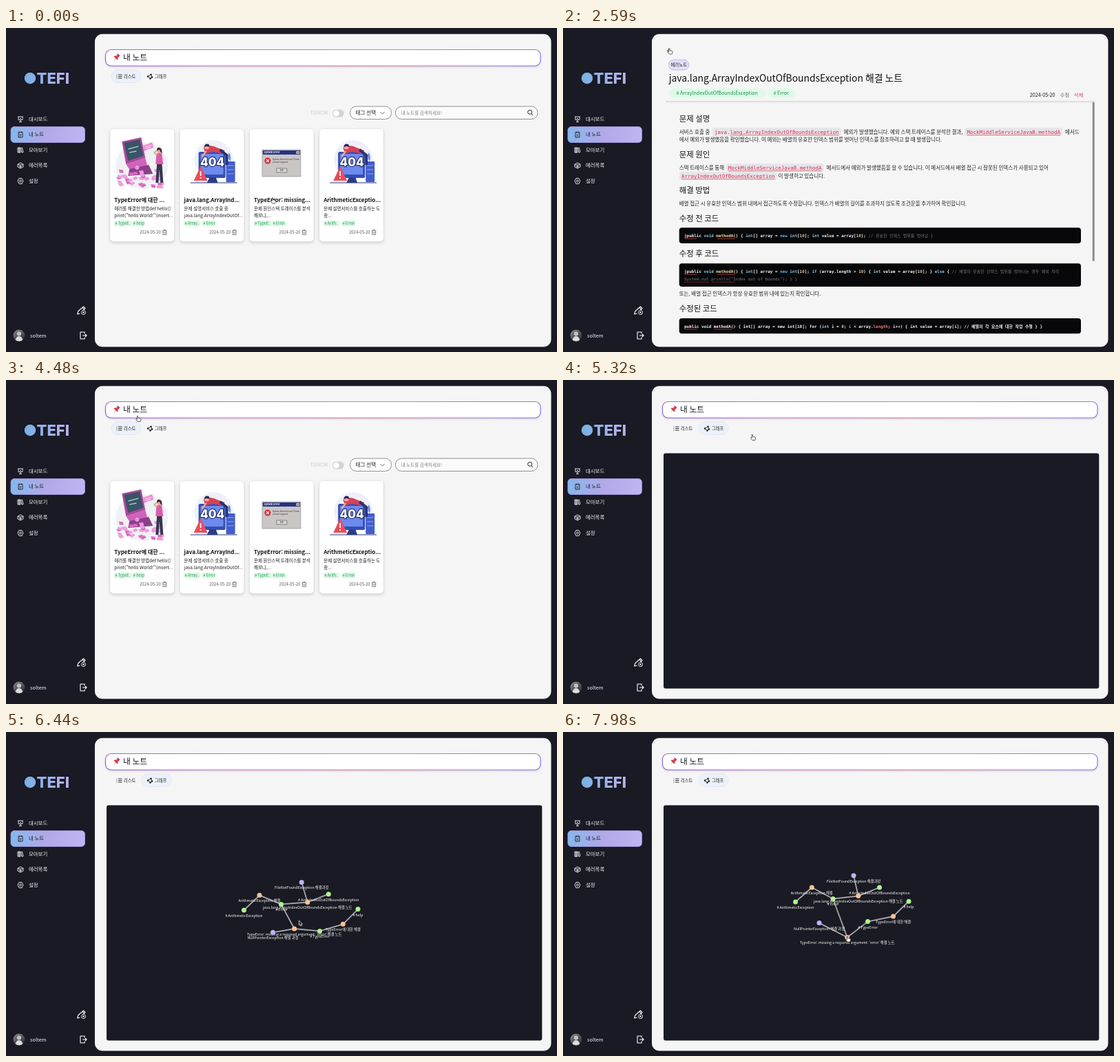
Recreate the animation shown at these times as an HTML page with a canvas. Size 800x471 px, loop 8000 ms.

```html
<!DOCTYPE html>
<html lang="ko">
<head>
<meta charset="utf-8">
<title>내 노트</title>
<style>
html, body { margin: 0; width: 100%; height: 100%; overflow: hidden; background: #191a23; }
canvas { display: block; width: 800px; height: 471px; }
</style>
</head>
<body>
<canvas id="stage"></canvas>
<script>
const LOOP = 8000, STEP = 70;
const SANS = '"Noto Sans CJK KR", "Noto Sans CJK", "Noto Sans", sans-serif';
const MONO = '"DejaVu Sans Mono", "Noto Sans CJK KR", monospace';
const DARK = '#191a23', PANEL = '#f5f5f5', INK = '#1c1c20';
const canvas = document.getElementById('stage');
const c = canvas.getContext('2d');
const dpr = window.devicePixelRatio || 1;
canvas.width = 800 * dpr;
canvas.height = 471 * dpr;

const clamp = v => Math.max(0, Math.min(1, v));
const smooth = v => { v = clamp(v); return v * v * (3 - 2 * v); };
const mix = (a, b, k) => a + (b - a) * k;

// y is the optical middle of the line
function text(s, x, y, size, color = INK, weight = 400, align = 'left', font = SANS) {
  c.font = `${weight} ${size}px ${font}`;
  c.textAlign = align;
  c.fillStyle = color;
  c.fillText(s, x, y + size * 0.36);
  return c.measureText(s).width;
}
function runs(x, y, size, parts) {
  for (const [s, color, weight = 700] of parts) x += text(s, x, y, size, color, weight, 'left', MONO);
}
function box(x, y, w, h, r, fill, stroke, lw = 1) {
  c.beginPath();
  c.roundRect(x, y, w, h, r);
  if (fill) { c.fillStyle = fill; c.fill(); }
  if (stroke) { c.strokeStyle = stroke; c.lineWidth = lw; c.stroke(); }
}
function disc(x, y, r, fill) {
  c.beginPath();
  c.arc(x, y, r, 0, 7);
  c.fillStyle = fill;
  c.fill();
}
function fill(d, color) {
  c.fillStyle = color;
  c.fill(new Path2D(d));
}
function line(d, color, lw = 1) {
  c.strokeStyle = color;
  c.lineWidth = lw;
  c.stroke(new Path2D(d));
}
function at(x, y, draw, angle = 0) {
  c.save();
  c.translate(x, y);
  c.rotate(angle);
  draw();
  c.restore();
}
function shadow(color, blur, dy) {
  c.shadowColor = color;
  c.shadowBlur = blur * dpr;
  c.shadowOffsetY = dy * dpr;
}
function ramp(x0, y0, x1, y1, ...colors) {
  const g = c.createLinearGradient(x0, y0, x1, y1);
  colors.forEach((col, i) => g.addColorStop(i / (colors.length - 1), col));
  return g;
}

// ---- sidebar ----
const MENU = [
  ['대시보드', 132, 'M-4 -3.5H4M-3 -3.5V1H3V-3.5M0 1V4M-2 4H2M-1 -1H1'],
  ['내 노트', 154.5, 'M-3 -3.5H3V4H-3ZM-1.5 -4.5V-2.5M1.5 -4.5V-2.5M-1.5 0H1.5M-1.5 2H1'],
  ['모아보기', 177, 'M-4 -3.5H-2V3.5H-4ZM-2 -3.5H0V3.5H-2ZM0.5 -3L2.5 -3.5L4 3L2 3.5Z'],
  ['에러목록', 199.5, 'M0 -4L4 -2V2L0 4L-4 2V-2ZM-4 -1H4M-2 1.5H2M0 -1V4'],
  ['설정', 222, 'M-2 -4H2L4 0L2 4H-2L-4 0ZM1.6 0A1.6 1.6 0 1 1 -1.6 0A1.6 1.6 0 1 1 1.6 0Z']
];
function sidebar() {
  const logo = ramp(27, 0, 92, 0, '#78b0e4', '#bcb3f0');
  disc(35, 73, 8.2, logo);
  text('TEFI', 44.5, 73, 22, logo, 800, 'left', 'Inter, "Liberation Sans", sans-serif');
  box(7, 143.5, 107.5, 23, 5, ramp(7, 0, 114, 0, '#86b7ec', '#b3a8e8', '#c0b5f2'), '#a99be8', 0.8);
  for (const [label, y, icon] of MENU) {
    const color = y === 154.5 ? '#20212c' : '#f2f2f5';
    at(21, y + 0.5, () => line(icon, color, 0.9));
    text(label, 33, y, 7.4, color, 500);
  }
  at(109.5, 411, () => {
    line('M-6 5L-4.5 0.5L3 -6L5.5 -3.5L1 1M-6 5L-2 4M1.5 -4.5L4 -2', '#fff', 1.1);
    disc(3, 2.5, 3.4, DARK);
    line('M6 2.5A3 3 0 1 1 0 2.5A3 3 0 1 1 6 2.5M1.5 2.5H4.5M3 1V4', '#fff', 0.9);
  });
  at(112, 447, () => line('M2 -2.5V-5H-4V5H2V2.5M-1 0H5M3 -2L5 0L3 2', '#fff', 1.1));
  disc(19, 447, 8.5, ramp(12, 438, 25, 456, '#8d8d8f', '#55565a', '#24252b'));
  c.save();
  c.beginPath();
  c.arc(19, 447, 8.5, 0, 7);
  c.clip();
  disc(19, 444.5, 3, '#c9c4c0');
  fill('M13 457Q14 448 19 448Q24 448 25 457Z', '#dedcda');
  c.restore();
  text('soltem', 35, 447, 7.4, '#f2f2f5', 500);
}

// ---- shared header of list and graph ----
function pin() {
  fill('M-2.6 -5H2.6L2 -3.6L1.7 -0.8Q3.6 0 3.6 2H-3.6Q-3.6 0 -1.7 -0.8L-2 -3.6Z', '#d8343f');
  fill('M-0.5 2H0.5L0 6Z', '#8f9499');
  line('M-0.7 -3.5V-0.5', '#f2838a', 0.8);
}
function header(graph) {
  c.save();
  shadow('rgba(90,60,140,.28)', 3, 1.5);
  box(144.5, 31.5, 631.5, 23.5, 8, '#fff');
  c.restore();
  box(144.5, 31.5, 631.5, 23.5, 8, null, ramp(144, 31, 776, 55, '#a25fe6', '#e066c4', '#e873a8', '#8f74ee'), 1.2);
  at(160.5, 42.5, pin, 0.75);
  text('내 노트', 170, 43, 11.8);
  box(graph ? 197 : 153, 61, 43, 18.5, 9, '#ecf1f9', '#dbe6f4', 0.8);
  at(164.5, 70.5, () => line('M-1.5 -2.5H4M-1.5 0H4M-1.5 2.5H4M-4 -2.5H-3M-4 0H-3M-4 2.5H-3', INK, 0.9));
  text('리스트', 171, 70.3, 6.3, INK, 500);
  at(209, 70.5, () => {
    line('M-3 0L1.5 -2.8L3 1L0.5 3L-3 0', INK, 0.9);
    for (const [x, y] of [[-3, 0], [1.5, -2.8], [3, 1], [0.5, 3]]) disc(x, y, 1.2, INK);
  });
  text('그래프', 215.8, 70.3, 6.3, INK, 500);
}

// ---- card pictures, drawn around their middle ----
function artPapers() {
  c.beginPath();
  c.ellipse(0, 3, 38, 34, 0, 0, 7);
  c.fillStyle = '#f0f1f4';
  c.fill();
  fill('M-29 -32L-1 -38L5 -8L-23 1Z', '#a8489e');
  fill('M-26 -30L-3 -35L2 -11L-20 -4Z', '#3d5266');
  fill('M-23 1L5 -8L8 4L-17 10Z', '#cf62bc');
  line('M-20 -21L-5 -25M-18 -16L-8 -18', '#8fd0c4', 1.3);
  fill('M-18 8L10 2L16 15L-20 18Z', '#8b3f8a');
  disc(-7, 6, 3, '#e59ad7');
  fill('M2 -26L15 -31L17 -23L7 -20L3 -17Z', '#ee8fd6');
  line('M5 -24L14 -27M6 -22L13 -24', '#fff', 0.7);
  let seed = 11;
  const rnd = () => (seed = seed * 16807 % 2147483647) / 2147483647;
  for (let i = 0; i < 34; i++) {
    const x = -33 + rnd() * 62, y = 10 + rnd() * 24;
    at(x, y, () => fill('M-4 -1.5L2 -2.5L4 1.5L-2 2.5Z', i % 3 ? '#ec9ddc' : '#d66bc2'), rnd() - 0.5);
  }
  fill('M22 -2L29 -2L31 28H27L25.5 9L24 28H20Z', '#38344f');
  fill('M21 -14Q25 -17 29 -14L31 1H20Z', '#d95caf');
  line('M22 -12L18 -16L22 -19', '#e9a58e', 2);
  disc(25, -18.5, 3.3, '#e9a58e');
  fill('M21.5 -19Q22 -24 26 -23Q30 -22 29 -14L27 -17L26 -20Z', '#352540');
}
function art404() {
  disc(3, -6, 28, '#eef1fb');
  box(-19, -17, 39, 38, 2, '#3450b4');
  box(-16, -14, 33, 30, 1, '#6d8af0');
  box(21, -3, 13, 30, 1, '#425dcc');
  line('M23 3H32M23 9H32M23 15H32', '#91a7fa', 1);
  line('M-31 28H37', '#27366f', 1.2);
  fill('M-3 20H6L9 28H-7Z', '#2a3c86');
  c.font = `800 17px Inter, sans-serif`;
  c.textAlign = 'center';
  c.lineWidth = 2.4;
  c.strokeStyle = '#27356e';
  c.strokeText('404', 1, 4);
  c.fillStyle = '#fff';
  c.fillText('404', 1, 4);
  fill('M-12 -23Q-3 -29 8 -23L19 -19L17 -14L3 -17L-9 -15Z', '#d94153');
  line('M12 -20L22 -12V2', '#28346d', 4);
  line('M-8 -18L-14 -10', '#f0a993', 2.3);
  disc(-7, -24, 3.6, '#f0a993');
  fill('M-11 -24Q-10 -30 -4 -28L-3 -24L-7 -25Z', '#252b53');
  fill('M-16 4L-6 25H-26Z', '#e94d5c');
  line('M-16 11V18M-16 20V22', '#fff', 1.7);
  fill('M27 -3Q22 -10 25 -16Q29 -11 27 -3Z', '#7084df');
}
function artDialog() {
  box(-28, -20, 56, 39, 0, '#c9c6c5', '#96949a', 0.7);
  box(-27, -19, 54, 6, 0, '#26327f');
  text('System Error', -25.5, -16, 3.6, '#fff', 700);
  box(21.5, -18, 4.5, 4, 0, '#d4d1d0');
  line('M22.8 -17L24.8 -15M24.8 -17L22.8 -15', '#222', 0.6);
  disc(-20, -4, 4.5, '#d9262e');
  line('M-22 -6L-18 -2M-18 -6L-22 -2', '#fff', 1.2);
  text('System failure found. Please', -13, -6, 3, '#333');
  text('contact support.', -13, -2, 3, '#333');
  box(-7, 7, 15, 6, 0, '#d8d5d4', '#555', 0.6);
  text('OK', 0.5, 10, 3.8, '#222', 400, 'center');
}

// ---- list page ----
const CARDS = [
  ['TypeError에 대한 ...', '에러를 해결한 방법def hello():', 'print("hello World!")insert...', '# TypeE..', '# help', artPapers],
  ['java.lang.ArrayInd...', '문제 설명서비스 호출 중', 'java.lang.ArrayIndexOutOf...', '# Array..', '# Error', art404],
  ['TypeError: missing...', '문제 원인스택 트레이스를 분석', '해보니,...', '# TypeE..', '# Error', artDialog],
  ['ArithmeticExceptio...', '문제 설명서비스를 호출하는 도', '중...', '# Arith..', '# Error', art404]
];
function tag(s, x, y) {
  c.font = `400 5.6px ${SANS}`;
  box(x - 1, y - 4, c.measureText(s).width + 2, 8, 1.5, '#d9fbe3');
  text(s, x, y, 5.6, '#1e9a50');
}
function card([title, a, b, t1, t2, art], i) {
  const x = 151.3 + i * 101.3;
  c.save();
  shadow('rgba(0,0,0,.2)', 4, 1.5);
  box(x, 147, 92.7, 163.5, 5, '#fff');
  c.restore();
  at(x + 46, 197, art);
  text(title, x + 6, 250.5, 8, '#111', 700);
  text(a, x + 6, 262.5, 6.5);
  text(b, x + 6, 272.3, 6.5);
  tag(t1, x + 7, 284);
  tag(t2, x + 33.5, 284);
  text('2024-05-20', x + 73.5, 297, 6, '#55565c', 400, 'right');
  at(x + 79, 297, () => line('M-3.3 -2.3H3.3M-1.2 -2.5V-3.6H1.2V-2.5M-2.5 -2V3.5H2.5V-2M-0.9 -0.5V2M0.9 -0.5V2', '#66676d', 0.8));
}
function listPage() {
  header(false);
  text('ERROR', 442.5, 123.3, 7.7, '#cfcfd2');
  box(474, 118.5, 16.5, 11, 5.5, '#d2d2d5');
  disc(479.5, 124, 4.4, '#fff');
  box(499.5, 114, 60, 18.5, 9, '#fff', '#77777c', 0.8);
  text('태그 선택', 507.5, 123.2, 7.6);
  line('M543.5 122L546.5 125L549.5 122', '#55555a', 0.9);
  box(565.5, 114, 206.5, 18.5, 9, '#fbfbfb', '#77777c', 0.8);
  text('내 노트를 검색하세요!', 573.5, 123.2, 6.6, '#85868c');
  line('M763.6 122.3A3 3 0 1 1 757.6 122.3A3 3 0 1 1 763.6 122.3M762.8 124.6L765.3 127', INK, 1);
  CARDS.forEach(card);
}

// ---- note page ----
function chip(s, x, y, tail) {
  c.font = `400 7.5px ${MONO}`;
  const w = c.measureText(s).width, skip = c.measureText(s.slice(0, tail)).width;
  box(x - 3, y - 6, w + 6, 12, 2.5, '#e6e6e9');
  text(s, x, y, 7.5, '#d92b5b', 400, 'left', MONO);
  line(`M${x + skip} ${y + 4.7}H${x + w}`, '#e5484d', 0.7);
}
const heading = (s, y) => text(s, 168.7, y, 11.4, '#141418', 500);
const para = (s, x, y) => text(s, x, y, 7.5, '#232328');
const W = '#f4f4f4', KEY = '#8fc7e8', FN = '#f1dfa2', NUM = '#e6c3a0', GREY = '#77787c';
const intro = first => [
  [first + ' ', W], ['void ', KEY], ['methodA', FN], ['() { ', W], ['int', KEY], ['[] array = ', W],
  ['new ', '#5eb6f0'], ['int', KEY], ['[', W], ['10', NUM], [']; ', W]
];
const assign = [['int ', KEY], ['value = array[', W], ['10', NUM], [']; ', W]];
function codeBox(y, h, parts, squiggle = 'M177 0H194M224 0H250') {
  box(168.7, y, 583.3, h, 4, '#08080a');
  runs(176, y + 11.5, 5.93, parts);
  at(0, y + 16, () => line(squiggle, '#d6494d', 0.7));
}
function noteBody() {
  heading('문제 설명', 132);
  para('서비스 호출 중', 168.7, 151);
  chip('java.lang.ArrayIndexOutOfBoundsException', 220, 151, 5);
  para('예외가 발생했습니다. 예외 스택 트레이스를 분석한 결과,', 407.5, 151);
  chip('MockMiddleServiceJavaB.methodA', 586.5, 151, 0);
  para('메서드', 729, 151);
  para('에서 예외가 발생했음을 확인했습니다. 이 예외는 배열의 유효한 인덱스 범위를 벗어난 인덱스를 참조하려고 할 때 발생합니다.', 168.7, 162.3);
  heading('문제 원인', 184);
  para('스택 트레이스를 통해', 168.7, 203);
  chip('MockMiddleServiceJavaB.methodA', 240, 203, 0);
  para('메서드에서 예외가 발생했음을 알 수 있습니다. 이 메서드에서 배열 접근 시 잘못된 인덱스가 사용되고 있어', 382.5, 203);
  chip('ArrayIndexOutOfBoundsException', 172, 215, 0);
  para('이 발생하고 있습니다.', 312.5, 215);
  heading('해결 방법', 236.3);
  para('배열 접근 시 유효한 인덱스 범위 내에서 접근하도록 수정합니다. 인덱스가 배열의 길이를 초과하지 않도록 조건문을 추가하여 확인합니다.', 168.7, 255);
  heading('수정 전 코드', 276.5);
  codeBox(290.3, 22.7, [...intro('jpublic'), ...assign, ['// 유효한 인덱스 범위를 벗어남 }', GREY, 400]]);
  heading('수정 후 코드', 328.3);
  codeBox(342.2, 33.8, [...intro('jpublic'), ['if ', KEY], ['(array.length > ', W], ['10', NUM], [') { ', W], ...assign,
    ['} ', W], ['else ', KEY], ['{ ', W], ['// 배열의 유효한 인덱스 범위를 벗어나는 경우 예외 처리', GREY, 400]]);
  runs(176, 365, 5.93, [['System.out.println("Index out of bounds"); } }', GREY, 400]]);
  line('M176 369.5H212M216 369.5H250', '#a53a40', 0.6);
  para('또는, 배열 접근 인덱스가 항상 유효한 범위 내에 있는지 확인합니다.', 168.7, 386.7);
  heading('수정된 코드', 408.3);
  codeBox(422, 22.3, [['public void methodA() { int[] array = new int[10]; for (', W], ['int', KEY], [' i = ', W], ['0', NUM],
    ['; ', W], ['i', '#e58a8a'], [' < array.', W], ['length', '#ef7d86'], ['; i++) { int value = array[i]; // 배열의 각 요소에 대한 작업 수행 } }', W]],
    'M177 0H195M219 0H245');
  line('M149 461.5H768', '#dcdcdf', 0.8);
  line('M155.5 476L161 469.7M155.5 473.5V476H158M158.7 469.7H161V472', INK, 0.9);
  text('0개', 165, 473, 7.5);
  text('댓글', 155.7, 497, 8.3, INK, 500);
  line('M176 494H183.5V500H181L179.7 501.4L178.5 500H176ZM178 497H178.8M179.5 497H180.3M181 497H181.8', INK, 0.8);
  box(153, 515, 615, 72, 3, '#fff');
  text('작성자', 159, 520.5, 7.3);
  line('M153 527H768', '#e9e9ec', 0.8);
  text('댓글을 작성해주세요...', 159, 538, 7.5, '#97989e');
  box(740, 567, 22.5, 14.5, 6, '#f0f0f1');
  text('등록', 751.2, 574.3, 6.6, '#76777b', 400, 'center');
}
function notePage(scroll) {
  line('M155 29.5L151.5 33L155 36.5', INK, 1);
  box(153.7, 46.3, 29, 14.6, 7, '#e6e1fb', '#b3a6ec', 0.8);
  text('에러노트', 168.2, 53.7, 6.5, INK, 400, 'center');
  text('java.lang.ArrayIndexOutOfBoundsException 해결 노트', 153.7, 73, 13.85, '#111', 500);
  box(154, 87.8, 139.5, 14, 7, '#dffae8');
  text('# ArrayIndexOutOfBoundsException', 164.5, 94.8, 7.1, '#17964b');
  box(297.5, 87.8, 40, 14, 7, '#dffae8');
  text('# Error', 305.5, 94.8, 7.1, '#17964b');
  text('2024-05-20', 677.7, 97, 7.2);
  text('수정', 721.7, 97, 7.3, '#66676d');
  text('삭제', 742, 97, 7.3, '#dd4664');
  c.save();
  c.beginPath();
  c.rect(145, 108, 624, 340);
  c.clip();
  c.translate(0, -142 * scroll);
  noteBody();
  c.restore();
  c.fillStyle = ramp(0, 105.5, 0, 110, '#d5d5d8', '#e6e6e8', 'rgba(240,240,240,0)');
  c.fillRect(149, 106, 623, 4);
  box(768.7, mix(107.5, 213, scroll), 3, 231.5, 1.5, '#8b8b8f');
}

// ---- graph page: label, colour, place at rest, place after the drag ----
const GREEN = '#aef58a', ORANGE = '#ffc291', VIOLET = '#bdb4fb';
const NODES = [
  ['# ArithmeticException', GREEN, 345.5, 259, 337.5, 247],
  ['ArithmeticException 해결', ORANGE, 368, 237.3, 361.3, 226],
  ['# Error', GREEN, 399.5, 250.4, 392, 242.5],
  ['FileNotFoundException 해결과정', VIOLET, 429.2, 218.5, 422, 208.8],
  ['# ArrayIndexOutOfBoundsException', GREEN, 468.3, 235.7, 459.5, 226],
  ['java.lang.ArrayIndexOutOfBoundsException 해결 노트', ORANGE, 437.8, 247.5, 428.7, 238.3],
  ['# help', GREEN, 511, 257.6, 502, 246.2],
  ['TypeError에 대한 해결', ORANGE, 489.3, 279.3, 479.5, 268],
  ['# TypeError', GREEN, 455.5, 289.4, 442.5, 275.6],
  ["TypeError: missing a required argument: 'error' 해결 노트", ORANGE, 418.7, 286, 412.7, 298.5],
  ['NullPointerException 해결 과정', VIOLET, 387.5, 291.3, 372, 277.6]
];
const LINKS = [[0, 1], [1, 2], [2, 5], [3, 5], [4, 5], [2, 9], [9, 10], [9, 8], [8, 7], [7, 6]];
function graphPage(t) {
  header(true);
  box(146, 106.5, 632.3, 342, 3, DARK);
  if (t < 5460) return;
  const grow = 1 - Math.pow(1 - clamp((t - 5390) / 800), 3);
  const drag = smooth((t - 6580) / 1400);
  const turn = (1 - grow) * 1.2, cos = Math.cos(turn) * grow, sin = Math.sin(turn) * grow;
  const pts = NODES.map(([, , x0, y0, x1, y1]) => {
    const dx = mix(x0, x1, drag) - 428, dy = mix(y0, y1, drag) - 262;
    return [428 + dx * cos - dy * sin, 262 + dx * sin + dy * cos];
  });
  for (const [a, b] of LINKS) line(`M${pts[a]}L${pts[b]}`, '#a6a6ab', 1.8);
  NODES.forEach(([label, color], i) => {
    const [x, y] = pts[i];
    disc(x, y, 3.5, color);
    text(label, x, y + 8, 5.3, '#fff', 400, 'center');
  });
}

// ---- pointer: time, x, y, hand ----
const MOVES = [
  [0, 388, 251, 1], [420, 312, 243, 1], [840, 306, 240, 1], [980, 306, 240, 0], [1470, 323, 266, 0],
  [2170, 323, 266, 0], [2590, 155.5, 34, 1], [2870, 155.5, 34, 0], [3220, 279, 276, 0], [3710, 279, 276, 0],
  [4060, 155.5, 34, 1], [4200, 155.5, 34, 1], [4700, 218, 72, 1], [5110, 218, 72, 1], [5320, 276, 83.5, 1],
  [5390, 290, 100, 0], [6160, 436, 292, 0], [6440, 427.5, 278, 0], [6580, 420, 288.5, 1], [7980, 414, 301, 1]
];
function pointer(t) {
  let i = MOVES.length - 1;
  while (MOVES[i][0] > t) i--;
  const a = MOVES[i], b = MOVES[i + 1] || a;
  const k = smooth((t - a[0]) / (b[0] - a[0] || 1));
  at(mix(a[1], b[1], k), mix(a[2], b[2], k), () => {
    const d = a[3]
      ? 'M-2 -4Q-1 -4.8 -0.6 -3.6L-0.3 -1.2L3 -0.5Q3.8 0 3.5 1.5L2.7 4H-1.2L-3.6 1Q-3.7 -0.2 -2.4 0.2L-1.6 0.8Z'
      : 'M-2 -4V3L-0.4 1.6L0.7 4.2L2 3.6L0.9 1.2H3Z';
    fill(d, a[3] ? '#fff' : '#111');
    line(d, a[3] ? '#222' : '#fff', 0.7);
  });
}

function draw(t) {
  c.setTransform(dpr, 0, 0, dpr, 0, 0);
  c.lineJoin = 'round';
  c.fillStyle = DARK;
  c.fillRect(0, 0, 800, 471);
  sidebar();
  box(129, 8.7, 662.5, 454.8, 11, PANEL);
  if (t < 840 || (t >= 4200 && t < 4900)) listPage();
  else if (t < 4200) notePage(smooth((t - 3200) / 300));
  else graphPage(t);
  pointer(t);
}

const start = performance.now();
let last = -1;
function tick() {
  const t = Math.floor(((performance.now() - start) % LOOP) / STEP) * STEP;
  if (t !== last) draw(last = t);
  requestAnimationFrame(tick);
}
tick();
</script>
</body>
</html>
```
